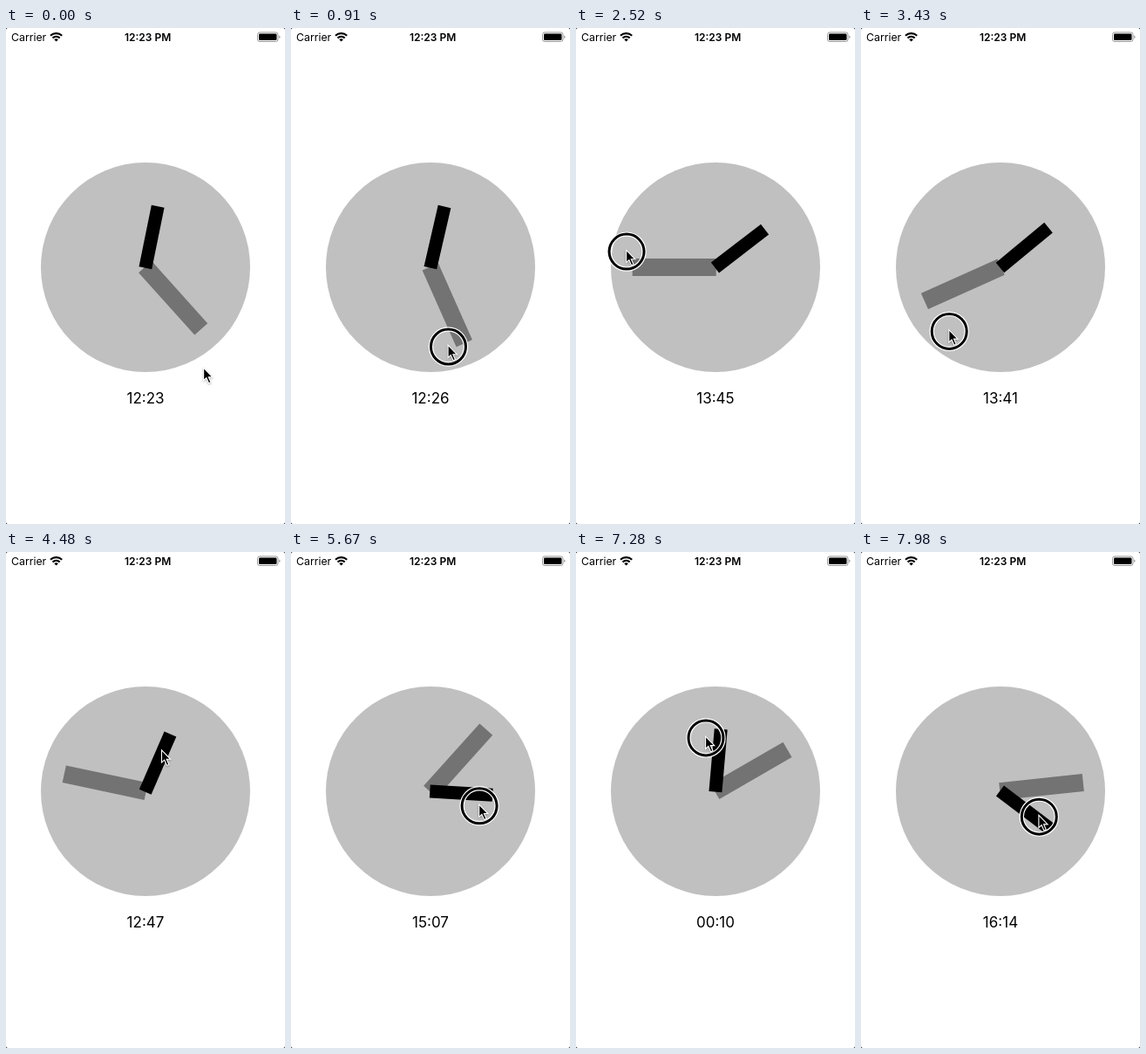
An HTML page for the animation above (8 s loop, 320 by 568 pixels).

```html
<!DOCTYPE html>
<html lang="en">
<head>
<meta charset="utf-8">
<title>Draggable clock</title>
<style>
  html, body { margin: 0; width: 100%; height: 100%; overflow: hidden; background: #000; }
  svg { display: block; width: 100vw; height: 100vh; }
  text { font-family: Inter, Roboto, sans-serif; }
</style>
</head>
<body>
<svg viewBox="0 0 320 568">
  <rect width="320" height="568" rx="2" fill="#fff"/>

  <!-- status bar -->
  <text x="6" y="14.6" font-size="12.3">Carrier</text>
  <g fill="none" stroke="#000" stroke-width="2.2">
    <path d="M51 8.8a9.6 9.6 0 0 1 13.2 0M53.5 11.5a6 6 0 0 1 8.2 0"/>
    <path d="M57.6 15.6l-2.3-2.4a3.4 3.4 0 0 1 4.6 0z" fill="#000" stroke="none"/>
  </g>
  <text x="162.6" y="14.6" font-size="12" font-weight="600" text-anchor="middle">12:23 PM</text>
  <rect x="288.5" y="5" width="23.5" height="10.5" rx="2.5" fill="none" stroke="#999"/>
  <rect x="290" y="6.5" width="20.5" height="7.5" rx="1.3"/>
  <path d="M313.3 8.5a2 2 0 0 1 0 3.6z" fill="#888"/>

  <!-- clock -->
  <circle cx="160" cy="274" r="120" fill="#c0c0c0"/>
  <rect id="minuteHand" x="150" y="178.7" width="20" height="96" fill="#737373"/>
  <rect id="hourHand" x="152.5" y="202.7" width="15" height="72"/>
  <text id="label" x="160" y="430" font-size="17" text-anchor="middle"></text>

  <!-- pointer with touch ring -->
  <g id="pointer">
    <g id="ring" fill="none">
      <circle r="20" stroke="#fff" stroke-width="5.4"/>
      <circle r="20" stroke="#000" stroke-width="3"/>
    </g>
    <path transform="translate(-.4 -1.8)" d="M0 0V14.3L3.2 11.4L6 17.6L8.4 16.6L5.7 10.5H10.2Z"
          stroke="#fff" stroke-width="1.1" style="filter: drop-shadow(0 1px 1px rgba(0,0,0,.3))"/>
  </g>
</svg>
<script>
const LOOP = 8000, STEP = 70;
const LEAD = 50; // the hands trail the pointer by this many ms
const CENTER = [160, 274], ENTRY = [227, 391];

// Points where the drag slows down: ms, minutes on the clock, pointer distance from center
const rests = [
  [0, 743, 94], [770, 743, 94], [1470, 770, 90], [2520, 825, 103], [2870, 855, 112],
  [4200, 767, 71], [4480, 767, 50], [5180, 767, 57], [6950, 1515, 64],
  [7070, 1515, 64], [8050, 966, 53]
];

const $ = id => document.getElementById(id);
const mix = (a, b, u) => a + (b - a) * u;
const progress = (t, start, length) => Math.max(0, Math.min(1, (t - start) / length));
const smooth = u => u * u * (3 - 2 * u);
const easeOut = u => 1 - (1 - u) ** 3;
const pad = n => String(n).padStart(2, "0");

function dragAt(t) {
  const i = rests.findIndex(rest => rest[0] > t);
  const [from, minutes, reach] = rests[i - 1], [to, nextMinutes, nextReach] = rests[i];
  const u = smooth(progress(t, from, to - from));
  return { minutes: mix(minutes, nextMinutes, u), reach: mix(reach, nextReach, u) };
}

function onDial(degrees, reach) {
  const a = degrees * Math.PI / 180;
  return [CENTER[0] + reach * Math.sin(a), CENTER[1] - reach * Math.cos(a)];
}

// Glide in to the minute hand, later across to the hour hand
function pointerAt(t) {
  const { minutes, reach } = dragAt(t + LEAD);
  const minuteGrip = onDial(minutes * 6, reach), hourGrip = onDial(minutes / 2, reach);
  const arrive = smooth(progress(t, 0, 420)), cross = easeOut(progress(t, 4270, 280));
  return ENTRY.map((v, i) => mix(mix(v, minuteGrip[i], arrive), hourGrip[i], cross));
}

function ringOpacity(t) {
  const fade = start => progress(t, start, 210);
  return fade(420) - fade(4270) + fade(4900);
}

const rotate = (id, degrees) =>
  $(id).setAttribute("transform", `rotate(${degrees} ${CENTER})`);

function draw(elapsed) {
  const t = Math.floor(elapsed % LOOP / STEP) * STEP;
  const minutes = Math.round(dragAt(t).minutes);
  rotate("minuteHand", minutes * 6);
  rotate("hourHand", minutes / 2);
  $("label").textContent = pad(Math.floor(minutes / 60) % 24) + ":" + pad(minutes % 60);
  $("pointer").setAttribute("transform", `translate(${pointerAt(t)})`);
  $("ring").setAttribute("opacity", ringOpacity(t));
}

let start;
function frame(now) {
  start ??= now;
  draw(now - start);
  requestAnimationFrame(frame);
}
requestAnimationFrame(frame);
</script>
</body>
</html>
```
